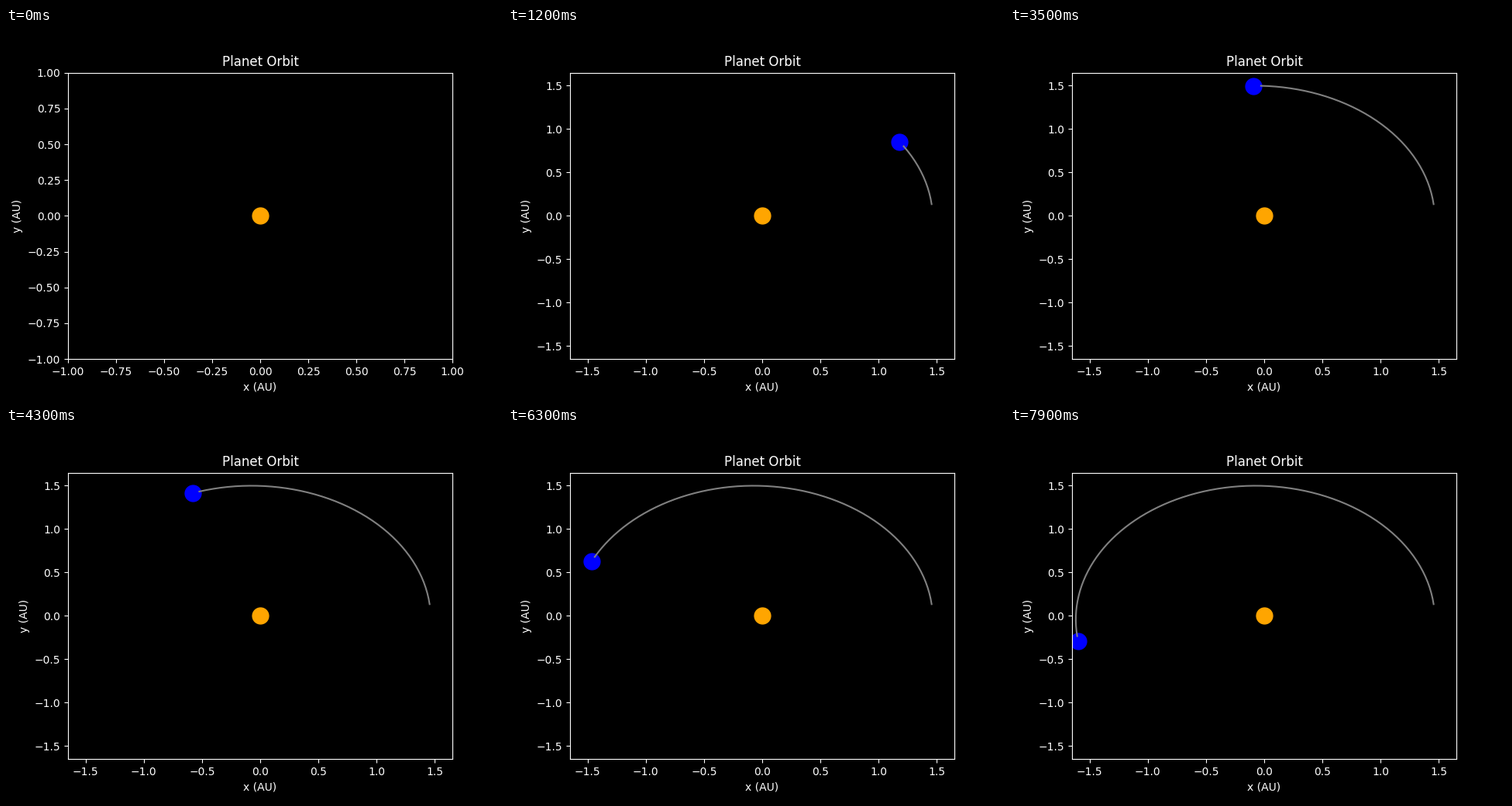
A matplotlib script that plays this animation: 640x480 px, repeating every 8 s.

```python
import numpy as np
import matplotlib.pyplot as plt
from matplotlib.animation import FuncAnimation

FRAMES = 80
INTERVAL = 100

# Orbit: semi-latus rectum (AU), eccentricity, perihelion direction
P, ECC, PERI = 1.5364, 0.0561, np.radians(27.7)
MEAN_START, MEAN_STEP = np.radians([-20.05, 2.2872])


def orbit(n):
    """Position on the Kepler orbit after n time steps."""
    mean = MEAN_START + MEAN_STEP * n
    ecc_anom = mean
    for _ in range(20):
        ecc_anom = mean + ECC * np.sin(ecc_anom)
    half = np.sqrt((1 + ECC) / (1 - ECC)) * np.tan(ecc_anom / 2)
    true = 2 * np.arctan(half)
    r = P / (1 + ECC * np.cos(true))
    return r * np.cos(true + PERI), r * np.sin(true + PERI)


xs, ys = orbit(np.arange(FRAMES))

plt.style.use("dark_background")
fig, ax = plt.subplots(figsize=(6.4, 4.8), dpi=100)
ax.set_title("Planet Orbit")
ax.set_xlabel("x (AU)")
ax.set_ylabel("y (AU)")

ax.plot(0, 0, "o", color="orange", markersize=15)
planet, = ax.plot([], [], "o", color="blue", markersize=15)
trail, = ax.plot([], [], color="gray", lw=1.5)


def update(n):
    lim = 1.65 if n else 1.0
    ax.set_xlim(-lim, lim)
    ax.set_ylim(-lim, lim)
    planet.set_data(xs[n:n + 1], ys[n:n + 1])
    trail.set_data(xs[:n], ys[:n])
    return planet, trail


anim = FuncAnimation(fig, update, frames=FRAMES, init_func=lambda: update(0),
                     interval=INTERVAL, repeat=True, repeat_delay=0)
plt.show()
```
